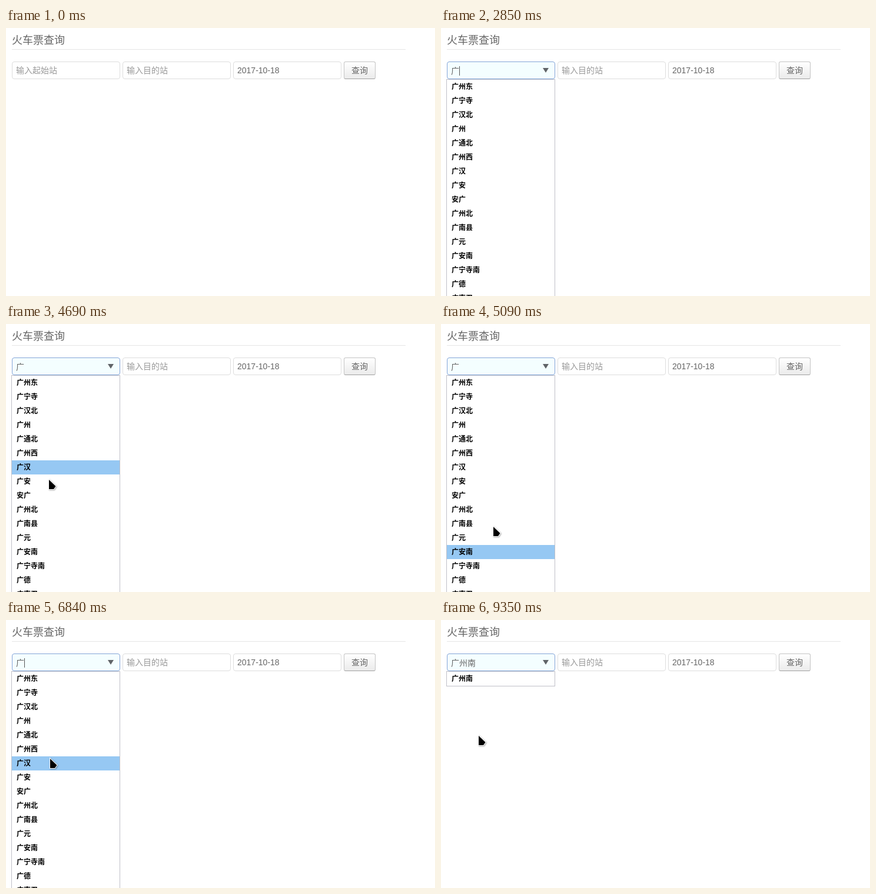
Animation, 729 px wide and 456 px high, one loop 9.52 s. Source, as an HTML page:

```html
<!DOCTYPE html>
<html lang="zh-CN">
<head>
<meta charset="utf-8">
<title>火车票查询</title>
<style>
html, body { margin: 0; width: 100%; height: 100%; overflow: hidden; background: #fff; }
body { position: relative; color: #666; font: 14px/16px "Liberation Sans", "Noto Sans CJK SC", sans-serif; }
body * { box-sizing: border-box; }
body > * { position: absolute; }
h1 { left: 10px; top: 11px; margin: 0; font-size: 18px; font-weight: 400; line-height: 20px; }
#rule { left: 10px; top: 36px; width: 669px; height: 1px; background: #e5e5e5; }
.field { top: 57px; width: 184px; height: 30px; padding: 6px; border: 1px solid #ddd; border-radius: 4px; white-space: pre; }
.hint { color: #999; }
#button { left: 574px; top: 57px; width: 54px; height: 30px; padding: 6px 12px; border: 1px solid #c4c4c4;
  border-bottom-color: #a0a0a0; border-radius: 3px; background: linear-gradient(#fff, #ebebeb); }
#arrow { left: 173px; top: 68px; width: 10px; height: 8px; background: #606468; clip-path: polygon(0 0, 100% 0, 50% 100%); }
#caret { width: 1px; height: 16px; background: #555; }
#list { left: 9px; top: 87px; width: 185px; border: 1px solid #c0c0c8; background: #fff; color: #000; font: bold 12px/24px "Liberation Sans", "Noto Sans CJK SC", sans-serif; }
#list div { height: 24px; padding-left: 8px; }
#list .hot { background: #96c8f3; }
#ime { top: 91px; height: 69px; padding: 8px 10px; border: 1px solid #ccc; background: #fff; line-height: 26px; white-space: pre; overflow: hidden; }
#pointer { left: 0; top: 0; overflow: visible; filter: drop-shadow(1px 1px 1px rgba(0,0,0,.35)); }
</style>
</head>
<body>
<h1>火车票查询</h1>
<div id="rule"></div>
<div id="from" class="field" style="left:10px"></div>
<div class="field hint" style="left:198px">输入目的站</div>
<div class="field" style="left:386px">2017-10-18</div>
<div id="button">查询</div>
<div id="arrow"></div>
<div id="caret"></div>
<div id="list"></div>
<div id="ime"></div>
<svg id="pointer" width="16" height="20"><path d="M0 0V16H8L11.5 11Z" stroke="#fff" stroke-width="2" paint-order="stroke"/></svg>
<script>
const LOOP = 9520, ROW = 24, LIST_TOP = 88;
const $ = id => document.getElementById(id);
const from = $('from'), arrow = $('arrow'), caret = $('caret'), list = $('list'), ime = $('ime'), pointer = $('pointer');

const all = '广州东 广宁寺 广汉北 广州 广通北 广州西 广汉 广安 安广 广州北 广南县 广元 广安南 广宁寺南 广德 广南卫'.split(' ');
const city = '广州东 广州 广州西 广州北 广州南'.split(' ');

// Step tracks: [start, value]
const texts = [[0, ''], [2850, '广'], [6930, '广州'], [8350, '广州南']];
const lists = [[0, []], [2850, all], [7050, city], [8350, ['广州南']]];
const gu = '1.广  2.光  3.逛  4.广告  5.广东', zh = '1.州  2.周  3.洲  4.粥  5.周末';
const imes = [
  [0, null],
  [1840, ['g', '1.个  2.过  3.给  4.高  5.该', 17, 328]],
  [2080, ['gu', '1.古  2.故  3.顾  4.估计  5.故事', 17, 361]],
  [2160, ['gua', '1.挂  2.瓜  3.刮  4.瓜子  5.挂号', 17, 361]],
  [2280, ['guan', '1.关  2.管  3.观  4.关于  5.管理', 17, 361]],
  [2400, ['guang', gu, 17, 327]],
  [2760, null],
  [5990, ['z', '1.在  2.中  3.这  4.再  5.做', 31, 340]],
  [6180, ['zh', '1.这  2.中  3.只  4.这个  5.知道', 31, 374]],
  [6260, ['zho', '1.中  2.种  3.重  4.中国  5.重要', 31, 374]],
  [6360, ['zhou', zh, 31, 339]],
  [6840, null]
];
const blinks = [[610, 1140], [1730, 2320], [2850, 3430], [4020, 4610], [5200, 5720], [6310, 7490], [8080, 8940]];
// Pointer keys: [time, x, y]
const path = [
  [4400, 60, 101], [4690, 73, 265], [4890, 92, 414], [4970, 92, 410], [5050, 90, 380], [5090, 89, 345],
  [5330, 75, 236], [7490, 75, 236], [7930, 62, 189], [8090, 62, 197], [9290, 62, 197], [9330, 64, 197]
];

const at = (track, t) => track.findLast(k => k[0] <= t)[1];
const mix = (a, b, p) => a + (b - a) * p;
const rgb = (a, b, p) => `rgb(${a.map((v, i) => mix(v, b[i], p))})`;

function pointerAt(t) {
  const i = path.findIndex(k => k[0] > t);
  if (i === 0) return null;
  if (i < 0) return path.at(-1).slice(1);
  const [t0, x0, y0] = path[i - 1], [t1, x1, y1] = path[i], p = (t - t0) / (t1 - t0);
  return [Math.round(mix(x0, x1, p)), Math.round(mix(y0, y1, p))];
}

let shown;
function drawList(items, hot) {
  if (shown !== items) {
    list.replaceChildren(...items.map(name => {
      const row = document.createElement('div');
      row.textContent = name;
      return row;
    }));
    list.hidden = !items.length;
    shown = items;
  }
  [...list.children].forEach((row, i) => row.classList.toggle('hot', i === hot));
}

function draw(t) {
  const text = at(texts, t), focus = Math.min(1, Math.max(0, (t - 570) / 330));
  from.textContent = text || '输入起始站';
  from.classList.toggle('hint', !text);
  from.style.paddingTop = text ? '7px' : '6px';
  from.style.background = rgb([255, 255, 255], [244, 254, 255], t < 610 ? 0 : focus);
  from.style.borderColor = rgb([221, 221, 221], [132, 164, 216], t < 610 ? 0 : focus);
  arrow.hidden = t < 610;

  caret.hidden = !blinks.some(([a, b]) => t >= a && t < b);
  caret.style.left = 17 + 14 * text.length + 'px';
  caret.style.top = text ? '65px' : '64px';

  const step = Math.floor((t - 10) / 40) * 40 + 10;
  const pos = pointerAt(step), past = pointerAt(step - 40);
  pointer.style.display = pos ? '' : 'none';
  if (pos) pointer.style.transform = `translate(${pos[0]}px,${pos[1]}px)`;
  drawList(at(lists, t), past ? Math.floor((past[1] - LIST_TOP) / ROW) : -1);

  const box = at(imes, t);
  ime.hidden = !box;
  if (box) {
    const [keys, words, left, right] = box;
    ime.textContent = keys + '\n' + words;
    ime.style.left = left + 'px';
    ime.style.width = right - left + 'px';
  }
}

const start = performance.now();
function tick() {
  draw((performance.now() - start) % LOOP);
  requestAnimationFrame(tick);
}
tick();
</script>
</body>
</html>
```
